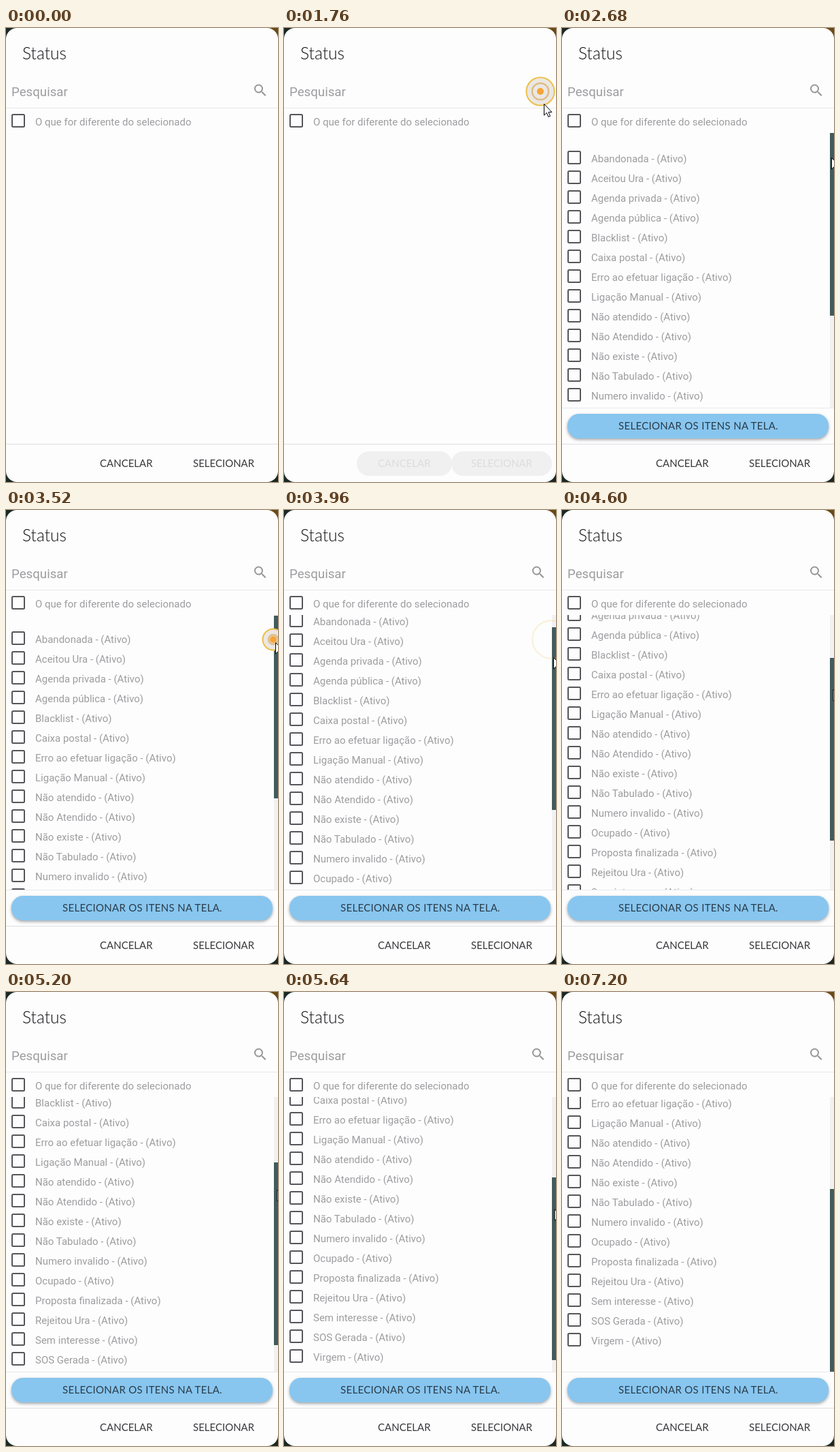
Recreate the animation shown at these times as an HTML page. Size 400 by 666 pixels, loop 9.88 s.

```html
<!DOCTYPE html>
<html lang="pt-BR">
<head>
<meta charset="utf-8">
<title>Status</title>
<style>
  html, body { margin: 0; width: 100%; height: 100%; overflow: hidden; background: #1c2824; }
  svg { display: block; width: 100%; height: 100%; }
  .body { font-family: Roboto, sans-serif; font-size: 15px; fill: #9d9da0; }
  .title { font-family: Lato, sans-serif; font-weight: 300; font-size: 24.5px; fill: #101014; }
  .caps { font-family: Lato, sans-serif; font-size: 15px; fill: #3a3a3e; }
  .wide { letter-spacing: .3px; fill: #2a3c4a; }
  .box { fill: none; stroke: #55555a; stroke-width: 2; }
  .line { stroke: #e9e9ee; }
  .pointer { fill: #fff; stroke: #000; stroke-width: 1; stroke-linejoin: round; }
  .action { filter: drop-shadow(0 2px 2px rgba(70, 75, 85, .5)); }
</style>
</head>
<body>
<svg viewBox="0 0 400 666">
  <defs>
    <clipPath id="viewport"><rect y="154" width="394" height="403"/></clipPath>
  </defs>
  <rect x="384" width="16" height="16" fill="#6a4a14"/>
  <rect width="400" height="666" rx="16" fill="#fdfdfd"/>
  <text class="title" x="24" y="46">Status</text>
  <text class="body" x="8" y="100" style="font-size:18.7px">Pesquisar</text>
  <path id="search" transform="translate(362 79.5)" fill="#97979a"
    d="M15.5 14h-.79l-.28-.27A6.47 6.47 0 0 0 16 9.5 6.5 6.5 0 1 0 9.5 16c1.61 0 3.09-.59 4.23-1.57l.27.28v.79l5 4.99L20.49 19zM9.5 14a4.5 4.5 0 1 1 0-9 4.5 4.5 0 0 1 0 9z"/>
  <path class="line" d="M0 117.5H400"/>
  <rect class="box" x="9" y="127" width="18" height="18" rx="1.5"/>
  <text class="body" x="43" y="143">O que for diferente do selecionado</text>

  <g id="results">
    <g clip-path="url(#viewport)"><g id="rows"></g></g>
    <rect x="394" y="154" width="6" height="403" fill="#f1f1f1"/>
    <rect id="thumb" x="394" width="6" height="268" fill="#425b5c"/>
    <path class="line" d="M0 557.5H400"/>
    <rect class="action" x="8" y="566" width="384" height="36" rx="17" fill="#88c6ef"/>
    <text class="caps wide" x="83" y="589">SELECIONAR OS ITENS NA TELA.</text>
  </g>

  <path d="M0 610.5H400" stroke="#dedee2"/>
  <g id="pills" fill="#f0f0f0">
    <rect x="107" y="621" width="140" height="36" rx="18"/>
    <rect x="246" y="621" width="148" height="36" rx="18"/>
  </g>
  <g id="buttons">
    <text class="caps" x="138" y="644">CANCELAR</text>
    <text class="caps" x="275" y="644">SELECIONAR</text>
  </g>

  <g id="click">
    <circle id="outer" stroke="#eebf4a" stroke-width="2" fill="#ebe7e2"/>
    <circle id="inner" fill="none" stroke="#dcbd88" stroke-width="2.5"/>
    <circle id="dot" r="5" fill="#f6a436"/>
  </g>
  <path id="arrow" class="pointer" d="M.5 .5V17l3.8-3.6 2.6 6 2.6-1.1-2.6-5.9h5z"/>
  <path id="hand" class="pointer"
    d="M-1.5 14V2Q-1.5 .5 0 .5T1.5 2V8Q4 7 4.5 9 7 8 7.5 10 10.5 9.5 10.5 12V16L8.5 21.5H-1L-5.5 14Q-5.5 11.5-3.5 12Z"/>
</svg>
<script>
const $ = id => document.getElementById(id);
const LOOP = 9880, STEP = 40;
const LOADING = 1520, LOADED = 2080;
const TRACK_TOP = 154, SCROLL_RATIO = 1.497;

const labels = ["Abandonada", "Aceitou Ura", "Agenda privada", "Agenda pública", "Blacklist",
  "Caixa postal", "Erro ao efetuar ligação", "Ligação Manual", "Não atendido", "Não Atendido",
  "Não existe", "Não Tabulado", "Numero invalido", "Ocupado", "Proposta finalizada",
  "Rejeitou Ura", "Sem interesse", "SOS Gerada", "Virgem"];

$("rows").innerHTML = labels.map((label, i) => {
  const y = 180 + 29 * i;
  return `<rect class="box" x="9" y="${y + 1}" width="18" height="18" rx="1.5"/>
    <text class="body" x="43" y="${y + 17}">${label} - (Ativo)</text>`;
}).join("");

// Each entry: time, x, y
const cursorPath = [
  [520, 398, 88], [760, 378, 94], [960, 378, 94], [1000, 377, 93], [1480, 377, 93],
  [1760, 382, 111], [2400, 384, 182], [2680, 396, 190], [3440, 396, 190],
  [3960, 396, 216], [4600, 398.5, 263], [5200, 398.5, 290], [5900, 397, 335],
  [6280, 393, 370], [6320, 402, 390], [6520, 402, 410],
  [6560, 393, 417], [6760, 366, 530], [6920, 356, 667]
];
// Each entry: time, thumb offset
const thumbPath = [[3480, 0], [3960, 18.5], [4600, 63.3], [5200, 96.9], [5960, 135]];
const clicks = [{ at: 1440, x: 377, y: 93 }, { at: 3320, x: 393, y: 190 }];
const CLICK_TIME = 720;

function sample(path, t) {
  if (t <= path[0][0]) return path[0].slice(1);
  const i = path.findIndex(p => p[0] > t);
  if (i < 0) return path[path.length - 1].slice(1);
  const a = path[i - 1], b = path[i];
  const k = (t - a[0]) / (b[0] - a[0]);
  return a.slice(1).map((v, n) => v + (b[n + 1] - v) * k);
}

function show(id, visible) {
  $(id).setAttribute("display", visible ? "inline" : "none");
}

function drawClick(t) {
  const click = clicks.find(c => t >= c.at && t < c.at + CLICK_TIME);
  show("click", click);
  if (!click) return;
  const p = (t - click.at) / CLICK_TIME;
  const radius = 4 + 24 * (1 - (1 - p) ** 2);
  const fade = Math.max(0, Math.min(1, (0.85 - p) / 0.4));
  $("click").setAttribute("transform", `translate(${click.x} ${click.y})`);
  $("outer").setAttribute("r", radius);
  $("outer").setAttribute("fill-opacity", fade);
  $("outer").setAttribute("stroke-opacity", Math.min(1, (1 - p) * 2));
  $("inner").setAttribute("r", Math.max(0, radius - 8.5));
  $("inner").setAttribute("opacity", fade);
  $("dot").setAttribute("opacity", fade);
}

function drawCursor(t) {
  const [x, y] = sample(cursorPath, t);
  const visible = t >= 520 && t < 6920;
  const hovering = t >= 680 && t < 1680;
  show("hand", visible && hovering);
  show("arrow", visible && !hovering);
  $(hovering ? "hand" : "arrow").setAttribute("transform", `translate(${x} ${y})`);
}

function draw(t) {
  const loading = t >= LOADING && t < LOADED;
  show("search", !loading);
  show("pills", loading);
  show("results", t >= LOADED);
  $("buttons").setAttribute("opacity", loading ? 0.1 : 1);

  const [offset] = sample(thumbPath, t);
  $("thumb").setAttribute("y", TRACK_TOP + Math.floor(offset));
  $("rows").setAttribute("transform", `translate(0 ${-Math.round(offset * SCROLL_RATIO)})`);

  drawClick(t);
  drawCursor(t);
}

const start = performance.now();
function tick() {
  const t = Math.max(0, performance.now() - start) % LOOP;
  draw(Math.floor(t / STEP) * STEP);
  requestAnimationFrame(tick);
}
tick();
</script>
</body>
</html>
```
